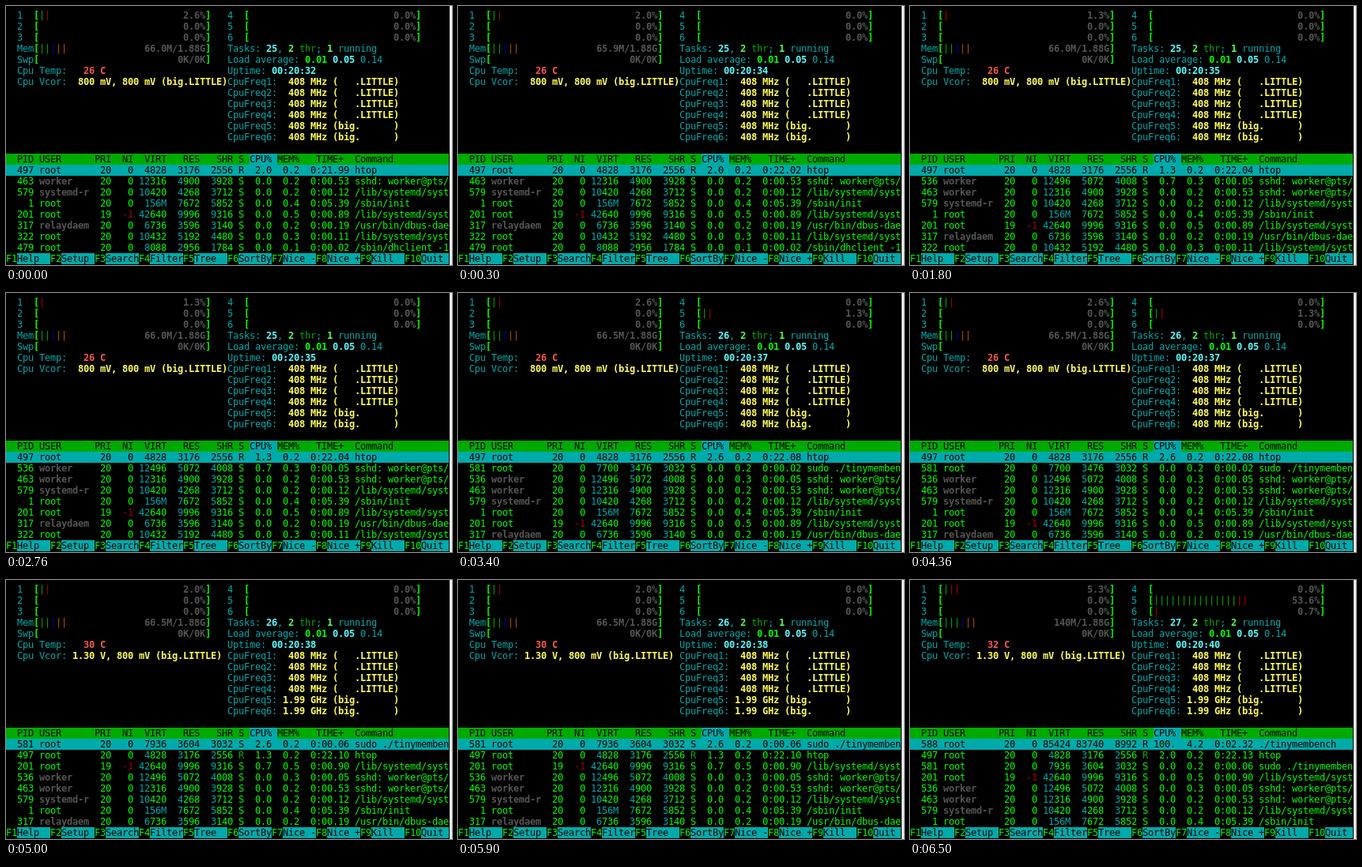
Recreate the animation shown at these times as an HTML page. Size 564 by 328 pixels, loop 8000 ms.

```html
<!DOCTYPE html>
<html lang="en">
<head>
<meta charset="utf-8">
<title>Process monitor</title>
<style>
  html, body { margin: 0; width: 100%; height: 100%; overflow: hidden; background: #000; }
  #screen {
    position: absolute; left: 0; top: 0; width: 560px; height: 328px; overflow: hidden;
    color: #0f0; font: 12px/14px "DejaVu Sans Mono", monospace;
    letter-spacing: calc(7px - 1ch); font-variant-ligatures: none;
  }
  #screen span { position: absolute; height: 14px; white-space: pre; }
  #edge { position: absolute; left: 561px; top: 0; width: 3px; height: 328px; background: #eee; }
  .bold, .gray, .hot, .yellow, .aqua, .lime { font-weight: bold; }
  .gray { color: #555; }
  .hot { color: #f55; }
  .yellow { color: #ff5; }
  .aqua { color: #5ff; }
  .lime { color: #5f5; }
  .cyan { color: #0aa; }
  .green { color: #0a0; }
  .red { color: #a00; }
  .blue { color: #00a; }
  .brown { color: #a50; }
  .onCyan { color: #000; background: #0aa; }
  .onGreen { color: #000; background: #0a0; }
</style>
</head>
<body>
<div id="screen"></div>
<div id="edge"></div>
<script>
const CELL_W = 7, CELL_H = 14, TOP = 5, LOOP = 8000;
const screen = document.getElementById('screen');
let html = '';

// pid: user, priority, nice, virt, res, shr, state, mem%, time, command
const processes = {
  1: ['root', 20, 0, '156M', 7672, 5852, 'S', '0.4', '0:05.39', '/sbin/init'],
  201: ['root', 19, -1, 42640, 9996, 9316, 'S', '0.5', '0:00.89', '/lib/systemd/systemd-journald'],
  317: ['relaydaem', 20, 0, 6736, 3596, 3140, 'S', '0.2', '0:00.19', '/usr/bin/dbus-daemon'],
  322: ['root', 20, 0, 10432, 5192, 4480, 'S', '0.3', '0:00.11', '/lib/systemd/systemd-logind'],
  463: ['worker', 20, 0, 12316, 4900, 3928, 'S', '0.2', '0:00.53', 'sshd: worker@pts/0'],
  479: ['root', 20, 0, 8088, 2956, 1784, 'S', '0.1', '0:00.02', '/sbin/dhclient -1'],
  497: ['root', 20, 0, 4828, 3176, 2556, 'R', '0.2', '', 'htop'],
  536: ['worker', 20, 0, 12496, 5072, 4008, 'S', '0.3', '0:00.05', 'sshd: worker@pts/1'],
  579: ['systemd-r', 20, 0, 10420, 4268, 3712, 'S', '0.2', '0:00.12', '/lib/systemd/systemd-resolved'],
  581: ['root', 20, 0, 7936, 3604, 3032, 'S', '0.2', '0:00.06', 'sudo ./tinymembench'],
  588: ['root', 20, 0, 85424, 83740, 8992, 'R', '4.2', '0:02.32', './tinymembench']
};

const idle = { cpu5: ['', '0.0%'], cpu6: ['', '0.0%'], memBars: 'ggbyy', tasks: 25, running: 1,
  temp: 26, volts: ' 800 mV', bigFreq: ' 408 MHz', cpu: {}, time: {}, size: {} };
const starting = { tasks: 26, mem: '66.5M' };
const busy = { volts: '1.30 V', bigFreq: '1.99 GHz' };

const states = [
  { at: 0, cpu1: ['gr', '2.6%'], mem: '66.0M', uptime: 32,
    pids: [497, 463, 579, 1, 201, 317, 322, 479], cpu: { 497: '2.0' }, time: { 497: '0:21.99' } },
  { at: 300, cpu1: ['gr', '2.0%'], mem: '65.9M', uptime: 34,
    pids: [497, 463, 579, 1, 201, 317, 322, 479], cpu: { 497: '2.0' }, time: { 497: '0:22.02' } },
  { at: 1800, cpu1: ['r', '1.3%'], mem: '66.0M', uptime: 35,
    pids: [497, 536, 463, 579, 1, 201, 317, 322],
    cpu: { 497: '1.3', 536: '0.7' }, time: { 497: '0:22.04' } },
  { at: 3400, ...starting, cpu1: ['gr', '2.6%'], cpu5: ['gr', '1.3%'], uptime: 37,
    pids: [497, 581, 536, 463, 579, 1, 201, 317], size: { 581: [7700, 3476] },
    cpu: { 497: '2.6' }, time: { 497: '0:22.08', 581: '0:00.02' } },
  { at: 5000, ...starting, ...busy, cpu1: ['gr', '2.0%'], uptime: 38, temp: 30,
    pids: [581, 497, 201, 536, 463, 579, 1, 317],
    cpu: { 581: '2.6', 497: '1.3', 201: '0.7' }, time: { 497: '0:22.10', 201: '0:00.90' } },
  { at: 6500, ...busy, cpu1: ['grr', '5.3%'], cpu5: ['g'.repeat(15) + 'rr', '53.6%'], cpu6: ['r', '0.7%'],
    mem: '140M', memBars: 'gggbyy', tasks: 27, running: 2, uptime: 40, temp: 32,
    pids: [588, 497, 581, 201, 536, 463, 579, 1],
    cpu: { 588: '100.', 497: '2.0' }, time: { 497: '0:22.13', 201: '0:00.90' } }
].map(state => ({ ...idle, ...state }));

function put(row, col, text, style = '') {
  html += `<span class="${style}" style="left:${col * CELL_W}px;top:${TOP + row * CELL_H}px">${text}</span>`;
}

// Writes [text, style] pieces one after another.
function putRun(row, col, pieces) {
  for (const [text, style] of pieces) {
    put(row, col, text, style);
    col += text.length;
  }
}

function putRight(row, endCol, text, style) {
  put(row, endCol - text.length, text, style);
}

function meter(row, col, label, bars, value) {
  const barStyles = { g: 'green', r: 'red', b: 'blue', y: 'brown' };
  put(row, col, label, 'cyan');
  put(row, col + 3, '[', 'bold');
  [...bars].forEach((bar, i) => put(row, col + 4 + i, '|', barStyles[bar]));
  putRight(row, col + 34, value, 'gray');
  put(row, col + 34, ']', 'bold');
}

// Thousands of kilobytes, and whole megabyte values, are tinted.
function memorySize(row, endCol, size, selected) {
  const text = String(size);
  if (selected) return putRight(row, endCol, text, 'onCyan');
  const split = text.endsWith('M') ? text.length : text.length - 3;
  putRun(row, endCol - text.length, [[text.slice(0, split), 'cyan'], [text.slice(split), '']]);
}

function processRow(row, pid, state, selected) {
  const [user, priority, nice, virt, res, shr, status, mem, time, command] = processes[pid];
  const [virtNow, resNow] = state.size[pid] || [virt, res];
  const tint = style => selected ? 'onCyan' : style;
  if (selected) put(row, 0, ' '.repeat(80), 'onCyan');
  putRight(row, 5, String(pid), tint(''));
  put(row, 6, user, tint(user === 'root' ? '' : 'gray'));
  putRight(row, 19, String(priority), tint(''));
  putRight(row, 23, String(nice), tint(nice < 0 ? 'red' : ''));
  memorySize(row, 29, virtNow, selected);
  memorySize(row, 35, resNow, selected);
  memorySize(row, 41, shr, selected);
  put(row, 42, status, tint(status === 'R' ? 'green' : ''));
  putRight(row, 48, state.cpu[pid] || '0.0', tint(''));
  putRight(row, 53, mem, tint(''));
  putRight(row, 62, state.time[pid] || time, tint(''));
  put(row, 63, command, tint(''));
}

function summary(s) {
  meter(0, 2, '1', ...s.cpu1);
  meter(1, 2, '2', '', '0.0%');
  meter(2, 2, '3', '', '0.0%');
  meter(3, 2, 'Mem', s.memBars, s.mem + '/1.88G');
  meter(4, 2, 'Swp', '', '0K/0K');
  putRun(5, 2, [['Cpu Temp:   ', 'cyan'], [s.temp + ' C', 'hot']]);
  putRun(6, 2, [['Cpu Vcor: ', 'cyan'], [s.volts + ', 800 mV (big.LITTLE)', 'yellow']]);

  meter(0, 40, '4', '', '0.0%');
  meter(1, 40, '5', ...s.cpu5);
  meter(2, 40, '6', ...s.cpu6);
  putRun(3, 40, [['Tasks: ', 'cyan'], [String(s.tasks), 'aqua'], [', ', 'cyan'], ['2', 'lime'],
    [' thr', 'green'], ['; ', 'cyan'], [String(s.running), 'lime'], [' running', 'cyan']]);
  putRun(4, 40, [['Load average: ', 'cyan'], ['0.01 ', 'bold'], ['0.05 ', 'aqua'], ['0.14', 'cyan']]);
  putRun(5, 40, [['Uptime: ', 'cyan'], ['00:20:' + s.uptime, 'aqua']]);
  for (let core = 1; core <= 6; core++) {
    const value = core < 5 ? ' 408 MHz (   .LITTLE)' : s.bigFreq + ' (big.      )';
    putRun(5 + core, 40, [[`CpuFreq${core}: `, 'cyan'], [value, 'yellow']]);
  }
}

function footer() {
  const labels = ['Help', 'Setup', 'Search', 'Filter', 'Tree', 'SortBy', 'Nice -', 'Nice +', 'Kill', 'Quit'];
  labels.forEach((label, i) =>
    putRun(22, i * 8, [['F' + (i + 1), ''], [label.padEnd(6), 'onCyan']]));
}

function draw(state) {
  html = '';
  summary(state);
  putRun(13, 0, [['  PID USER      PRI  NI  VIRT   RES   SHR S ', 'onGreen'], ['CPU% ', 'onCyan'],
    ['MEM%   TIME+  Command'.padEnd(31), 'onGreen']]);
  state.pids.forEach((pid, i) => processRow(14 + i, pid, state, i === 0));
  footer();
  screen.innerHTML = html;
}

let shown = null;
function tick() {
  const time = performance.now() % LOOP;
  const state = states.findLast(s => s.at <= time);
  if (state !== shown) draw(shown = state);
  requestAnimationFrame(tick);
}
tick();
</script>
</body>
</html>
```
